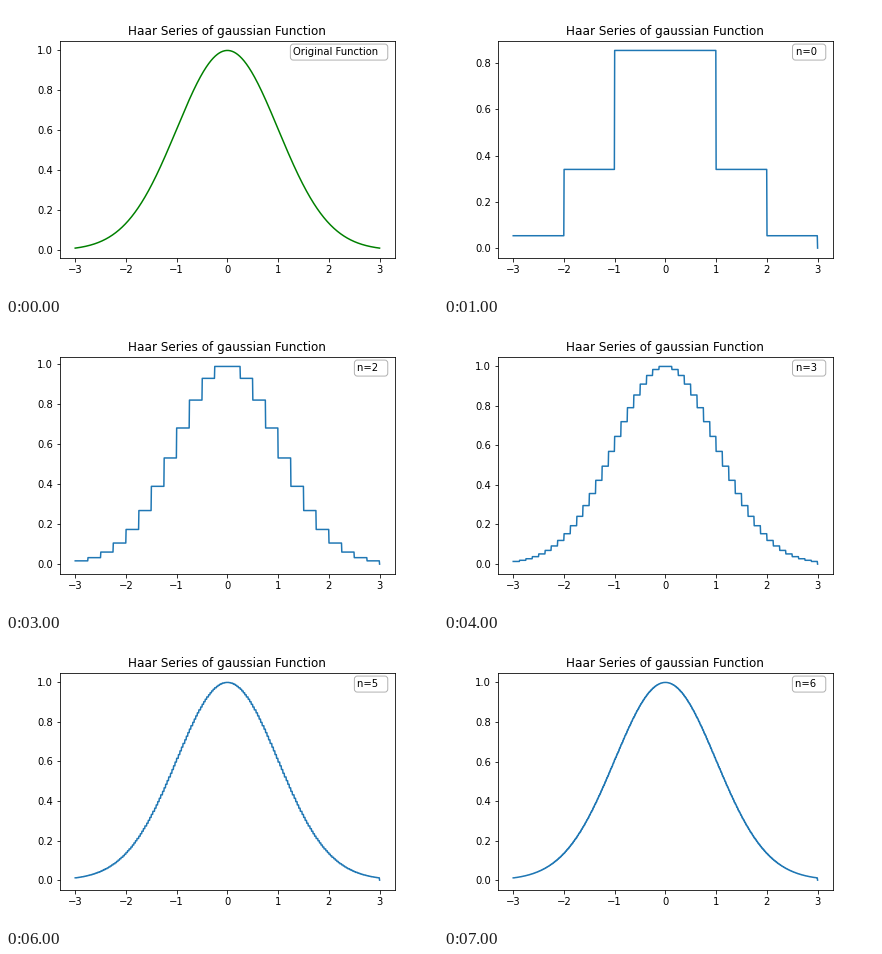
Write a matplotlib script that moves like this. It is 432 px wide and 288 px high and loops after 8 s.

```python
import math

import matplotlib.pyplot as plt
import numpy as np
from matplotlib.animation import FuncAnimation

LEVELS = 7
STEP_MS = 1000

plt.rcParams.update({"font.family": "DejaVu Sans", "font.size": 10})

fig, ax = plt.subplots(figsize=(6, 4), dpi=72)
fig.subplots_adjust(left=0.125, right=0.9, bottom=0.125, top=0.88)

x = np.linspace(-3, 3, 1000)
gauss_area = np.vectorize(lambda t: math.sqrt(math.pi / 2) * math.erf(t / math.sqrt(2)))


def haar(n):
    """Mean of the gaussian over dyadic cells of width 2**-n on [-3, 3)."""
    width = 2.0 ** -n
    left = np.floor(x / width) * width
    mean = (gauss_area(left + width) - gauss_area(left)) / width
    return np.where(x < 3, mean, 0)


def draw(frame):
    ax.clear()
    if frame == 0:
        ax.plot(x, np.exp(-x**2 / 2), color="green")
        label = "Original Function"
    else:
        ax.plot(x, haar(frame - 1), color="C0")
        label = f"n={frame - 1}"
    ax.set_title("Haar Series of gaussian Function")
    ax.text(0.97, 0.97, label + "  ", transform=ax.transAxes, ha="right", va="top",
            bbox=dict(boxstyle="round", facecolor="white", edgecolor="black", alpha=0.3))
    return ax.get_children()


anim = FuncAnimation(fig, draw, frames=LEVELS + 1, init_func=lambda: [],
                     interval=STEP_MS, repeat=True, repeat_delay=0)
plt.show()
```
